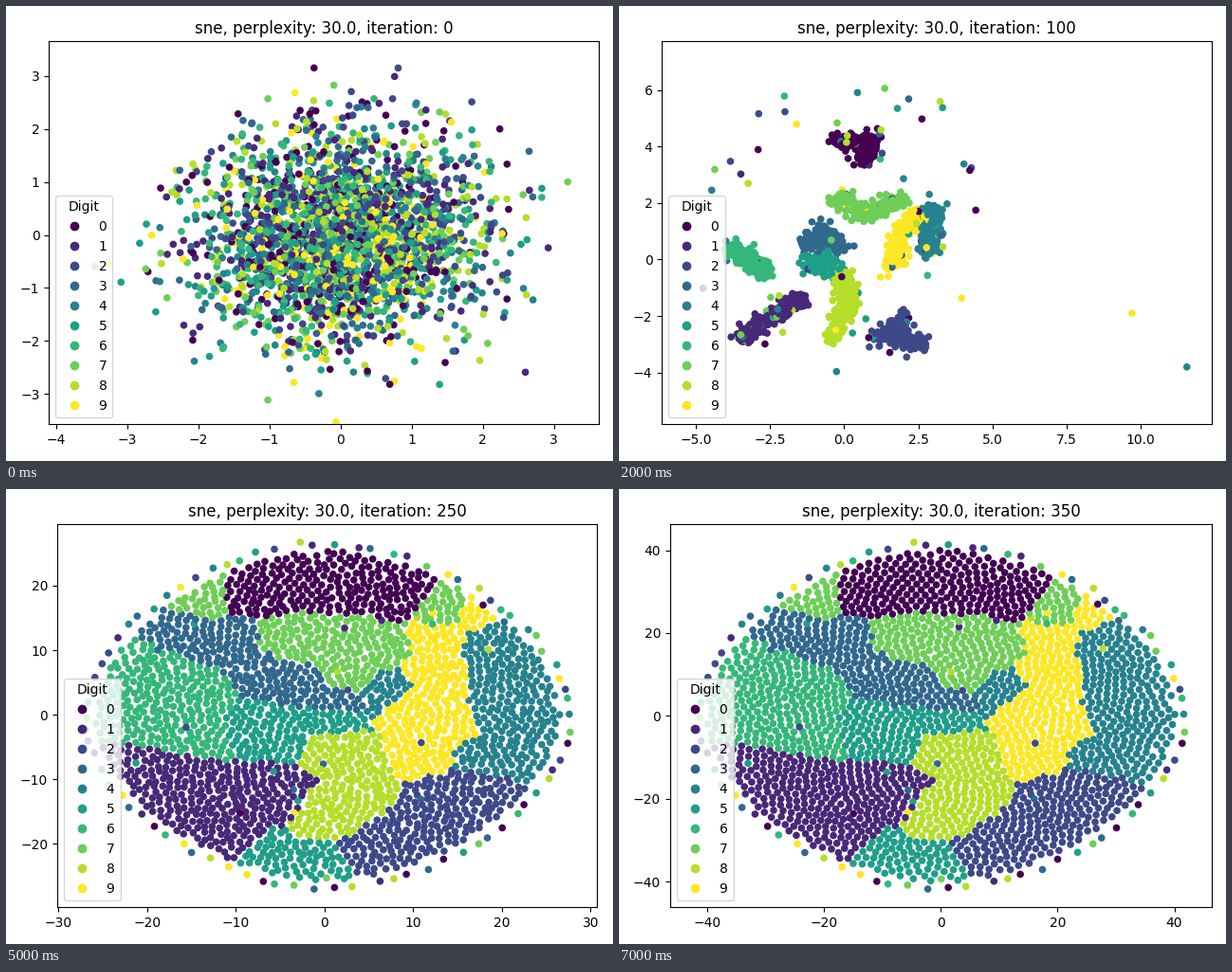
A matplotlib script that plays this animation: 640x480 px, repeating every 8 s.

```python
import numpy as np
import matplotlib.pyplot as plt
from matplotlib.animation import FuncAnimation
from matplotlib.ticker import MultipleLocator

# iteration: x limits, y limits, tick steps
VIEWS = {
    0: ((-4.10, 3.63), (-3.57, 3.65), (1, 1)),
    50: ((-5.19, 10.49), (-5.0, 6.7), (2.5, 2)),
    100: ((-6.15, 12.39), (-5.83, 7.72), (2.5, 2)),
    150: ((-11.8, 11.9), (-10.75, 10.75), (5, 5)),
    200: ((-20.12, 21.25), (-20.57, 20.68), (5, 5)),
    250: ((-30.13, 30.76), (-29.82, 29.48), (10, 10)),
    300: ((-39.08, 39.57), (-38.6, 38.6), (10, 10)),
    350: ((-46.42, 46.42), (-46.24, 46.25), (20, 20)),
}
STEPS = list(VIEWS)

# digit and spine of each cluster in the tight layout
TIGHT = [
    (0, [(-.2, 4.2), (.9, 4.2), (.6, 3.6)]),
    (1, [(-3.5, -2.8), (-2.4, -2), (-1.4, -1.4)]),
    (2, [(1.1, -2.8), (2, -2.1), (1.8, -2.9), (2.7, -3)]),
    (3, [(-1.2, .5), (-.7, 1), (-.2, .4)]),
    (4, [(3, 1.8), (2.8, .2)]),
    (5, [(-1.2, -.1), (-.3, -.3)]),
    (6, [(-3.9, .4), (-3.2, 0), (-2.6, -.4)]),
    (7, [(-.2, 2.2), (.7, 1.6), (2.1, 2.2)]),
    (8, [(-.2, -.4), (.2, -1.4), (-.4, -2.8)]),
    (9, [(2.6, 1.7), (1.9, .9), (1.6, -.3)]),
]

# digit and key points of each patch in the wide map, in map radii
PATCHES = [
    (0, [(-.29, .71), (-.08, .77), (.14, .77), (.31, .72)]),
    (1, [(-.79, -.36), (-.58, -.36), (-.59, -.6), (-.38, -.47),
         (-.21, -.47), (-.4, -.69)]),
    (2, [(.62, -.44), (.44, -.5), (.31, -.63), (.18, -.79)]),
    (3, [(-.6, .49), (-.4, .43), (-.29, .27), (-.11, .18), (.04, .09)]),
    (4, [(.64, .4), (.73, .48), (.71, .24), (.71, 0), (.68, -.22),
         (.81, -.22)]),
    (4, [(.24, .13)]),
    (5, [(-.3, -.06), (-.15, -.09), (.02, -.03)]),
    (5, [(-.22, -.82), (-.02, -.87)]),
    (6, [(-.87, .13), (-.73, .29), (-.73, 0), (-.52, .13), (-.52, -.09)]),
    (7, [(-.16, .43), (.02, .38), (.21, .4), (.08, .21)]),
    (7, [(.48, .62)]),
    (7, [(-.53, .68)]),
    (8, [(.02, -.17), (.14, -.25), (0, -.57), (.16, -.47)]),
    (9, [(.33, .05), (.46, .24), (.48, -.06), (.35, -.2), (.46, .44),
         (.62, .6)]),
]

rng = np.random.default_rng(7)


def mislabel(digits, share):
    """Give a share of the points a random digit."""
    odd = rng.random(len(digits)) < share
    return np.where(odd, rng.integers(0, 10, len(digits)), digits)


def around(t, r, power=2):
    """Points at angle t and radius r on a circle or soft diamond."""
    c, s = np.cos(t), np.sin(t)
    r = r * (abs(c) ** power + abs(s) ** power) ** (-1 / power)
    return np.stack([r * c, r * s], 1)


def make_cloud(n=2500):
    return rng.normal(size=(n, 2)), rng.integers(0, 10, n)


def make_tight(each=235, lone=55):
    parts, digits = [], []
    for digit, spine in TIGHT:
        x, y = np.array(spine).T
        t = rng.uniform(0, len(x) - 1, each)
        k = np.arange(len(x))
        line = np.stack([np.interp(t, k, x), np.interp(t, k, y)], 1)
        parts.append(line + rng.normal(0, .16, (each, 2)))
        digits.append(np.full(each, digit))
    order = rng.permutation(each * len(TIGHT))
    pos = np.concatenate(parts)[order]
    dig = mislabel(np.concatenate(digits)[order], .04)

    ring = around(rng.uniform(0, 2 * np.pi, lone), rng.uniform(.5, 1, lone))
    ring = ring * (5.2, 6) + (0, .9)
    ring_dig = rng.integers(0, 10, lone)
    # the two farthest points set the width of the view
    ring[:2] = (9.7, -1.9), (11.55, -3.8)
    ring_dig[:2] = 9, 4
    return np.concatenate([pos, ring]), np.concatenate([dig, ring_dig])


def settle(pos, reach, rounds=14):
    """Push close neighbours apart until the packing is even."""
    p = pos.astype(np.float32)
    for _ in range(rounds):
        dx = p[:, None, 0] - p[None, :, 0]
        dy = p[:, None, 1] - p[None, :, 1]
        dist = np.sqrt(dx * dx + dy * dy) + 1e-6
        push = np.maximum(reach - dist, 0) / dist * .22
        p += np.stack([(dx * push).sum(1), (dy * push).sum(1)], 1)
        norm = (abs(p) ** 1.75).sum(1) ** (1 / 1.75)
        p /= np.maximum(norm / .95, 1)[:, None]
    return p


def make_map(n=2360, rim=78):
    k = np.arange(n)
    spiral = around(k * np.pi * (3 - 5 ** .5), .94 * np.sqrt((k + .5) / n), 1.75)
    loose = spiral + rng.normal(0, .011, (n, 2))
    even = settle(loose, .043)

    seeds = np.concatenate([pts for _, pts in PATCHES])
    owner = np.repeat(np.arange(len(PATCHES)), [len(p) for _, p in PATCHES])
    gap = np.hypot(*(even[:, None] - seeds).transpose(2, 0, 1))
    home = owner[gap.argmin(1)]
    mids = np.array([even[home == i].mean(0) for i in range(len(PATCHES))])
    digits = np.array([d for d, _ in PATCHES])[home]

    t = 2 * np.pi * (np.arange(rim) + rng.uniform(-.3, .3, rim)) / rim
    edge = around(t, rng.uniform(.98, 1.01, rim), 1.75)
    dig = np.concatenate([mislabel(digits, .018), rng.integers(0, 10, rim)])
    return loose, even, mids[home], edge, dig


cloud, cloud_dig = make_cloud()
tight, tight_dig = make_tight()
loose, even, mids, edge, map_dig = make_map()
blur = rng.normal(0, .12, tight.shape)


def wide_map(it):
    """The map grows with its view while its packing evens out."""
    calm = min((it - 150) / 150, 1)
    body = loose + (even - loose) * calm
    size = 1 - .2 * (1 - calm) ** 3
    unit = np.concatenate([mids + (body - mids) * size, edge])
    lims = np.array(VIEWS[it][:2])
    return lims.mean(1) + unit * np.diff(lims).T / 2.2


def points(it):
    if it == 0:
        return cloud, cloud_dig
    if it == 50:
        return .85 * tight + blur, tight_dig
    if it == 100:
        return tight, tight_dig
    return wide_map(it), map_dig


fig = plt.figure(figsize=(6.4, 4.8), dpi=100)
ax = fig.add_subplot()


def draw(i):
    it = STEPS[i]
    xlim, ylim, (xstep, ystep) = VIEWS[it]
    pos, dig = points(it)
    ax.clear()
    dots = ax.scatter(*pos.T, c=dig, s=20, cmap="viridis", vmin=0, vmax=9)
    ax.set(xlim=xlim, ylim=ylim,
           title=f"sne, perplexity: 30.0, iteration: {it}")
    ax.xaxis.set_major_locator(MultipleLocator(xstep))
    ax.yaxis.set_major_locator(MultipleLocator(ystep))
    ax.legend(*dots.legend_elements(num=None), loc="lower left", title="Digit")
    fig.tight_layout()
    return [dots]


anim = FuncAnimation(fig, draw, frames=len(STEPS), interval=1000,
                     init_func=lambda: [], repeat=True)
plt.show()
```
